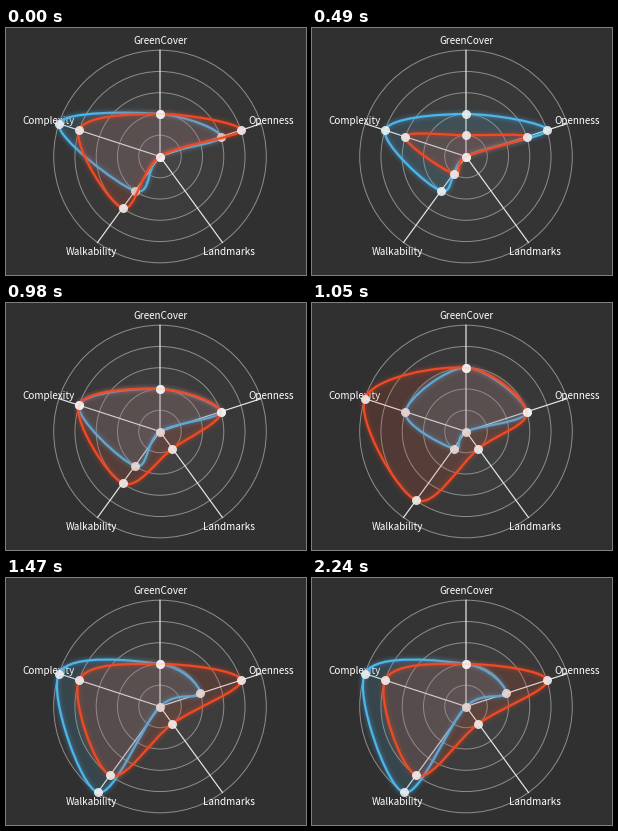
Animation, 300 px wide and 247 px high, one loop 2.31 s. Source, as a matplotlib script:

```python
import numpy as np
import matplotlib.pyplot as plt
from matplotlib.animation import FuncAnimation
from matplotlib.patches import Circle, PathPatch
from matplotlib.path import Path

W, H, DPI = 300, 247, 100
PX = 72 / DPI                     # one pixel in points
FRAMES, INTERVAL = 33, 70
HOLD, LEAD = 6.7, 6               # frames per profile, frames already elapsed at start
CENTER, RADIUS, LEVELS = np.array([154.0, 128.5]), 106.3, 5
BG, BLUE, RED = "#303030", "#4db5ea", "#f04a24"

# Typical score per axis; each profile only states how it departs from it.
BASE = dict(GreenCover=2, Openness=3, Landmarks=0, Walkability=2, Complexity=4)


def profile(green=0, openness=0, landmarks=0, walk=0, complexity=0):
    return np.array([*BASE.values()]) + [green, openness, landmarks, walk, complexity]


BLUE_RUN = [
    profile(complexity=1),
    profile(openness=1),
    profile(),
    profile(green=1, walk=-1, complexity=-1),
    profile(openness=-1, walk=3, complexity=1),
]
RED_RUN = [
    profile(openness=1, walk=1),
    profile(green=-1, walk=-1, complexity=-1),
    profile(landmarks=1, walk=1),
    profile(green=1, landmarks=1, walk=2, complexity=1),
    profile(openness=1, landmarks=1, walk=2),
]

angles = np.arange(len(BASE)) * 2 * np.pi / len(BASE)
dirs = np.column_stack([np.sin(angles), -np.cos(angles)])


def cardinal_closed(pts, k=1 / 6):
    """Closed cardinal spline through pts as a Bezier path."""
    nxt = np.roll(pts, -1, axis=0)
    tan = k * (nxt - np.roll(pts, 1, axis=0))
    verts = [pts[0]]
    for a, b, ta, tb in zip(pts, nxt, tan, np.roll(tan, -1, axis=0)):
        verts += [a + ta, b - tb, b]
    return Path(verts, [Path.MOVETO] + [Path.CURVE4] * (len(verts) - 1))


class Blob:
    """One data series: filled area, glowing outline and dots."""

    def __init__(self, ax, color, run, z):
        self.run = run
        empty = Path([CENTER, CENTER])
        self.shapes = [PathPatch(empty, fc=color, ec="none", alpha=0.14, zorder=z)]

        def outline(width, alpha):
            self.shapes.append(PathPatch(empty, fc="none", ec=color, lw=width * PX,
                                         alpha=alpha, joinstyle="round", zorder=z + 1))

        for width in range(11, 2, -2):
            outline(width, 0.4 / width)
        outline(2.2, 1)
        for shape in self.shapes:
            ax.add_patch(shape)
        self.dots, = ax.plot([], [], "o", ms=9 * PX, mfc="#f4f4f4", mec="none",
                             alpha=0.87, zorder=z + 2, snap=False)

    def show(self, step):
        pts = CENTER + dirs * self.run[step][:, None] * RADIUS / LEVELS
        path = cardinal_closed(pts)
        for shape in self.shapes:
            shape.set_path(path)
        self.dots.set_data(*pts.T)
        return [*self.shapes, self.dots]


fig = plt.figure(figsize=(W / DPI, H / DPI), dpi=DPI, facecolor=BG)
ax = fig.add_axes([0, 0, 1, 1])
ax.set_xlim(0, W)
ax.set_ylim(H, 0)
ax.axis("off")

for level in range(LEVELS, 0, -1):
    r = RADIUS * level / LEVELS
    ax.add_patch(Circle(CENTER, r, fc="#cdcdcd", ec="none", alpha=0.03, zorder=1))
    ax.add_patch(Circle(CENTER, r, fc="none", ec="#8c8c8c", lw=PX, zorder=2))

for d, label in zip(dirs, BASE):
    ax.plot(*zip(CENTER, CENTER + d * RADIUS), color="#e6e6e6", lw=1.2 * PX,
            zorder=3, snap=False)
    x, y = CENTER + d * RADIUS * 1.1
    ax.text(x, y + 4, label, color="white", size=9.9 * PX, ha="center",
            va="baseline", family="Noto Sans CJK JP", zorder=4)

blobs = [Blob(ax, BLUE, BLUE_RUN, 5), Blob(ax, RED, RED_RUN, 8)]


def update(frame):
    step = min(int((frame + LEAD) / HOLD), len(RED_RUN) - 1)
    return [artist for blob in blobs for artist in blob.show(step)]


anim = FuncAnimation(fig, update, frames=FRAMES, interval=INTERVAL,
                     repeat=True, repeat_delay=0)
plt.show()
```
